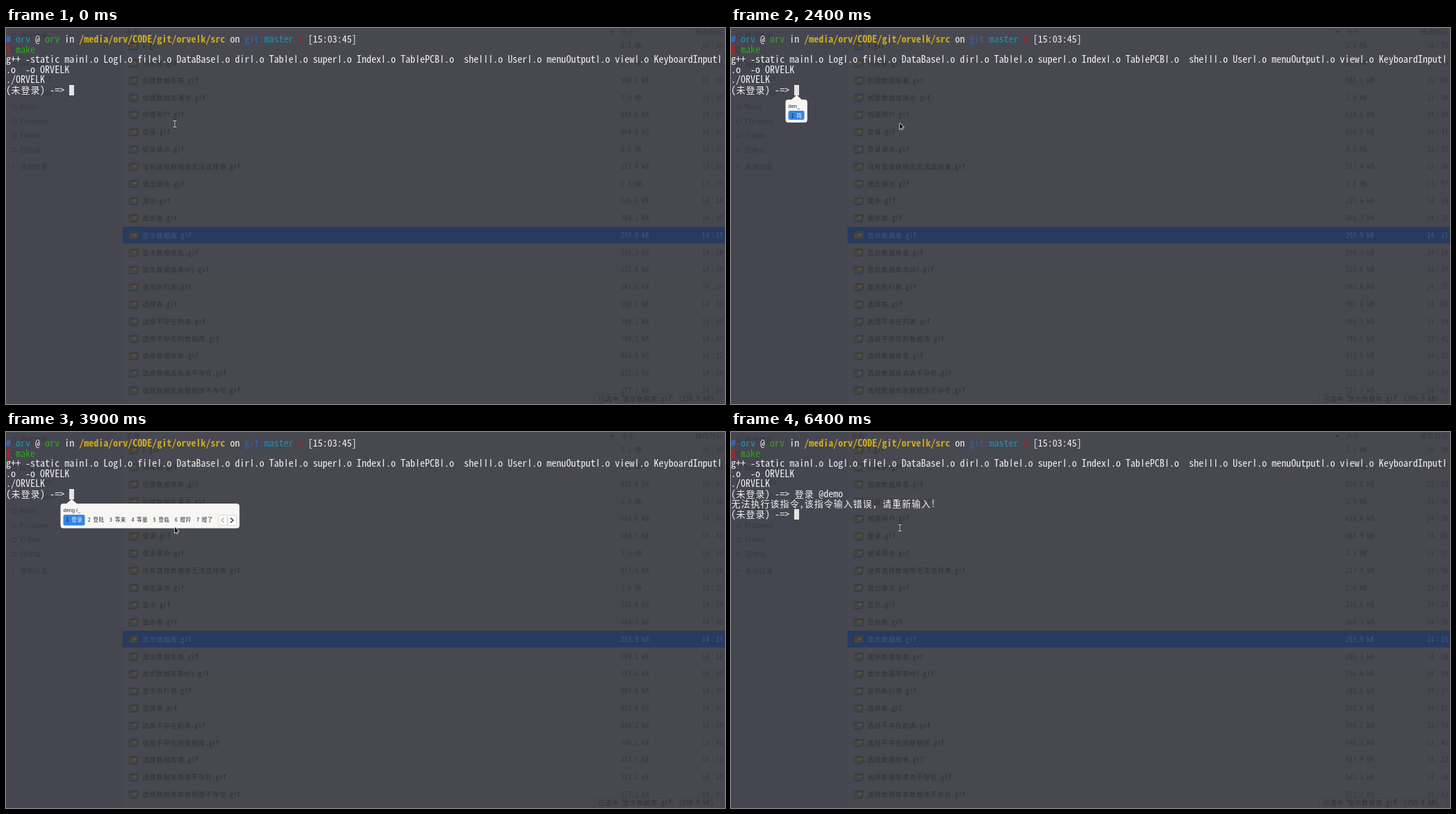
Write an HTML page with a canvas that moves like this. It is 1035 px wide and 541 px high and loops after 8 s.

```html
<!DOCTYPE html>
<html lang="zh-CN">
<head>
<meta charset="utf-8">
<title>Terminal login</title>
<style>
html, body { margin: 0; width: 100%; height: 100%; overflow: hidden; background: #484850; }
canvas { display: block; }
</style>
</head>
<body>
<canvas id="stage" width="1035" height="541"></canvas>
<script>
const ctx = document.getElementById('stage').getContext('2d');
const LOOP = 8000;
const CELL = 7.012;
const MONO = '"Noto Sans Mono CJK SC", "Noto Sans CJK SC", "Noto Sans CJK", "Noto Sans Mono", monospace';
const SANS = '"Liberation Sans", sans-serif';
const WHITE = '#f2f2f2';
const PANEL = '#484850';
const NAME = '#313139';
const DETAIL = '#383840';
const PLACE = '#373842';
const SELECTED = '#48557a';
const PROMPT = '(未登录) -=> ';

const files = `1|2.1 MB|10∶35
创建表|1.2 MB|14∶55
创建数据库表|938.0 kB|15∶03
创建数据库演示|2.9 MB|13∶38
创建用户|618.6 kB|14∶50
登录|668.9 kB|14∶41
登录演示|3.5 MB|13∶37
没有选择数据库无法选择表|217.4 kB|13∶56
退出演示|1.8 MB|13∶37
显示|235.6 kB|14∶14
显示表|368.3 kB|14∶35
显示数据库|259.9 kB|14∶15
显示数据库表|299.3 kB|14∶18
显示数据库表n行|151.6 kB|14∶39
显示执行表|282.6 kB|14∶37
选择表|992.8 kB|14∶01
选择不存在的表|398.2 kB|13∶59
选择不存在的数据库|746.1 kB|13∶41
选择数据库表|413.9 kB|14∶12
选择数据库表表不存在|522.2 kB|14∶10
选择数据库表数据库不存在|277.2 kB|14∶03`.split('\n').map(line => line.split('|'));

const places = ['最近使用', 'Home', 'Desktop', 'Documents', 'Downloads', 'Music', 'Pictures', 'Videos', '回收站'];

const typed = (at, text) => ({ at, text, pointer: 'beam' });
const compose = (at, preedit, words, pointer = 'arrow') =>
  ({ at, text: '', preedit, words: words.split(' '), pointer });

const steps = [
  typed(0, ''), typed(900, 'd'), typed(1100, 'de'), typed(1200, 'den'), typed(1300, 'deng'),
  typed(1500, 'den'), typed(1600, 'de'), typed(1800, 'd'), typed(1900, ''),
  compose(2200, 'de', '的 得 地 德 嘚 锝 底'),
  compose(2400, 'den', '扽'),
  compose(3100, 'de n l g', '地念两个 的能力 地念 大恩 得 得年 的呢'),
  compose(3300, 'de n l', '得能 的年 地念 大恩 得你 得年 的呢'),
  compose(3500, 'den', '扽', 'beam'),
  compose(3600, 'deng', '等 登 灯 瞪 凳 蹬 澄'),
  compose(3900, 'deng l', '登录 登陆 等来 等量 登临 瞪羚 瞪了'),
  typed(4200, '登录'), typed(4300, '登录 '), typed(4700, '登录 @'),
  typed(5000, '登录 @ed'), typed(5200, '登录 @edm'), typed(5500, '登录 @ed'),
  typed(5700, '登录 @e'), typed(5800, '登录 @'), typed(5900, '登录 @d'), typed(6000, '登录 @de'),
  typed(6200, '登录 @demo'),
  { ...typed(6400, '登录 @demo'), submitted: true }
];

const isWide = ch => ch === '∶' || ch.charCodeAt(0) > 0x2e7f;
const columns = text => [...text].reduce((n, ch) => n + (isWide(ch) ? 2 : 1), 0);

// Draws text on a fixed cell grid; y is the vertical middle of the line.
function cells(text, x, y, color, size = 14, cell = CELL, weight = '') {
  ctx.fillStyle = color;
  ctx.textAlign = 'center';
  for (const ch of text) {
    const wide = isWide(ch);
    const width = cell * (wide ? 2 : 1);
    ctx.font = `${weight} ${wide ? size * 0.93 : size}px ${ch === 'l' ? SANS : MONO}`;
    ctx.fillText(ch, x + width / 2, y + size * 0.33);
    x += width;
  }
  return x;
}

function rect(x, y, w, h, color) {
  ctx.fillStyle = color;
  ctx.fillRect(x, y, w, h);
}

function rounded(x, y, w, h, r, fill, stroke) {
  ctx.beginPath();
  ctx.roundRect(x, y, w, h, r);
  if (fill) { ctx.fillStyle = fill; ctx.fill(); }
  if (stroke) { ctx.strokeStyle = stroke; ctx.lineWidth = 1; ctx.stroke(); }
}

function trace(points) {
  ctx.beginPath();
  points.forEach(([x, y]) => ctx.lineTo(x, y));
}

function polygon(points, color) {
  trace(points);
  ctx.closePath();
  ctx.fillStyle = color;
  ctx.fill();
}

function polyline(points, color, width) {
  trace(points);
  ctx.strokeStyle = color;
  ctx.lineWidth = width;
  ctx.stroke();
}

const small = (text, x, y, color) => cells(text, x, y, color, 10, 5.05);

function thumbnail(x, y) {
  rounded(x + 2, y - 6, 12, 10, 1, '#3c4345');
  rounded(x, y - 5, 12, 11, 1, '#3b3c3f');
  rect(x + 1, y - 3, 5, 4, '#54403c');
  rect(x + 6, y - 3, 5, 4, '#565339');
  rect(x + 1, y + 1, 5, 3, '#3c4f40');
  rect(x + 6, y + 1, 5, 3, '#3b4858');
}

function drawFileManager() {
  rect(0, 0, 1035, 541, PANEL);
  rect(0, 0, 167, 541, '#454650');
  rect(167, 0, 1, 541, '#43444c');

  places.forEach((name, i) => {
    const y = 11.5 + i * 20.5;
    rounded(8.5, y - 3, 6, 6, 2, null, PLACE);
    small(name, 20, y, PLACE);
  });
  small('+', 8, 200, PLACE);
  small('其他位置', 20, 200, PLACE);

  small('名称', 173, 6, DETAIL);
  small('大小', 885, 6, DETAIL);
  small('修改时间', 992, 6, DETAIL);
  polygon([[870, 4], [876, 4], [873, 8]], DETAIL);

  files.forEach(([name, size, time], i) => {
    const y = 26 + i * 24.78;
    const selected = name === '显示数据库';
    if (selected) rect(168, 286, 867, 24, '#293a60');
    thumbnail(177, y);
    small(name + '.gif', 196, y, selected ? SELECTED : NAME);
    small(size, 885, y, selected ? SELECTED : DETAIL);
    small(time, 1002, y, selected ? SELECTED : DETAIL);
  });

  rounded(846.5, 526.5, 184, 18, 3, PANEL, '#414149');
  small('已选中“显示数据库.gif” (259.9 kB)', 852, 534, NAME);
}

const rowY = row => 16.5 + row * 14.55;
const line = (text, row, color = WHITE) => cells(text, 0, rowY(row), color);

function drawShell() {
  const prompt = [
    ['# ', '#2f72d8', 'bold'], ['orv', '#1795b4'], [' @ ', WHITE], ['orv', '#35a51e'],
    [' in ', WHITE], ['/media/orv/CODE/git/orvelk/src', '#cdab1c', 'bold'], [' on ', WHITE],
    ['git:', '#2b66b4'], ['master', '#1795b4'], [' x', '#c4161c'], [' [15:03:45]', WHITE]
  ];
  let x = 0;
  for (const [text, color, weight] of prompt) x = cells(text, x, rowY(0), color, 14, CELL, weight);

  cells('$', 0, rowY(1), '#d8151a', 14, CELL, 'bold');
  cells('make', 2 * CELL, rowY(1), '#35a51e');
  line('g++ -static mainl.o Logl.o filel.o DataBasel.o dirl.o Tablel.o superl.o Indexl.o ' +
    'TablePCBl.o  shelll.o Userl.o menuOutputl.o viewl.o KeyboardInputl', 2);
  line('.o  -o ORVELK', 3);
  line('./ORVELK', 4);
}

function drawInput({ text, submitted }) {
  line(PROMPT + text, 5);
  let cursorRow = 5;
  let col = columns(PROMPT + text);
  if (submitted) {
    line('无法执行该指令,该指令输入错误, 请重新输入!', 6);
    line(PROMPT, 7);
    cursorRow = 7;
    col = columns(PROMPT);
  }
  rect(Math.round(col * CELL), Math.round(82 + (cursorRow - 5) * 14.5), 7, 15, '#e4e4e4');
}

function pageButton(x, direction, color) {
  rounded(x + 0.5, 119.5, 12.5, 15, 2, '#fdfdfc', '#d9d6d3');
  const mid = x + 6.5;
  polyline([[mid - 2 * direction, 123.5], [mid + 2 * direction, 127], [mid - 2 * direction, 130.5]], color, 1.3);
}

function drawCandidates({ preedit, words }) {
  const paged = words.length > 1;
  const step = word => 15.4 + 7.95 * word.length;
  const end = words.reduce((x, word) => x + step(word), 86.5);
  const right = paged ? end + 30.5 : end;

  polygon([[86, 104], [94.5, 96.5], [103, 104]], '#f8f6f5');
  rounded(78.5, 103, right - 78.5, paged ? 35.5 : 33, 4, '#f8f6f5');

  ctx.font = `7.5px ${SANS}`;
  ctx.textAlign = 'left';
  ctx.fillStyle = '#25282b';
  ctx.fillText(preedit + '_', 82.5, 115);

  rounded(82.5, 119, step(words[0]) - 0.3, paged ? 15.5 : 13, 2.5, '#3584e4');
  let x = 86.5;
  words.forEach((word, i) => {
    cells(String(i + 1), x, 126, '#25282b', 8, 4);
    cells(word, x + 7.5, 126, i ? '#25282b' : '#eef4fd', 8, 4);
    x += step(word);
  });
  if (paged) {
    pageButton(end, -1, '#a9a7a5');
    pageButton(end + 13, 1, '#25282b');
  }
}

function drawPointer(kind) {
  if (kind === 'beam') {
    for (const [color, width] of [['#26262c', 2.4], ['#d5d5d8', 1]]) {
      polyline([[240.5, 133.5], [245.5, 133.5]], color, width);
      polyline([[243, 133.5], [243, 142.5]], color, width);
      polyline([[240.5, 142.5], [245.5, 142.5]], color, width);
    }
    return;
  }
  const arrow = [[243, 137], [243, 145.2], [244.9, 143.4], [246.1, 146], [247.2, 145.4], [246.1, 143], [248.4, 142.6]];
  polyline([...arrow, arrow[0]], '#f0f0f0', 1.4);
  polygon(arrow, '#101014');
}

function draw(step) {
  drawFileManager();
  drawShell();
  drawInput(step);
  if (step.words) drawCandidates(step);
  drawPointer(step.pointer);
}

const start = performance.now();
let shown;
function tick() {
  const time = (performance.now() - start) % LOOP;
  const step = steps.findLast(s => s.at <= time);
  if (step !== shown) draw(shown = step);
  requestAnimationFrame(tick);
}
tick();
</script>
</body>
</html>
```
